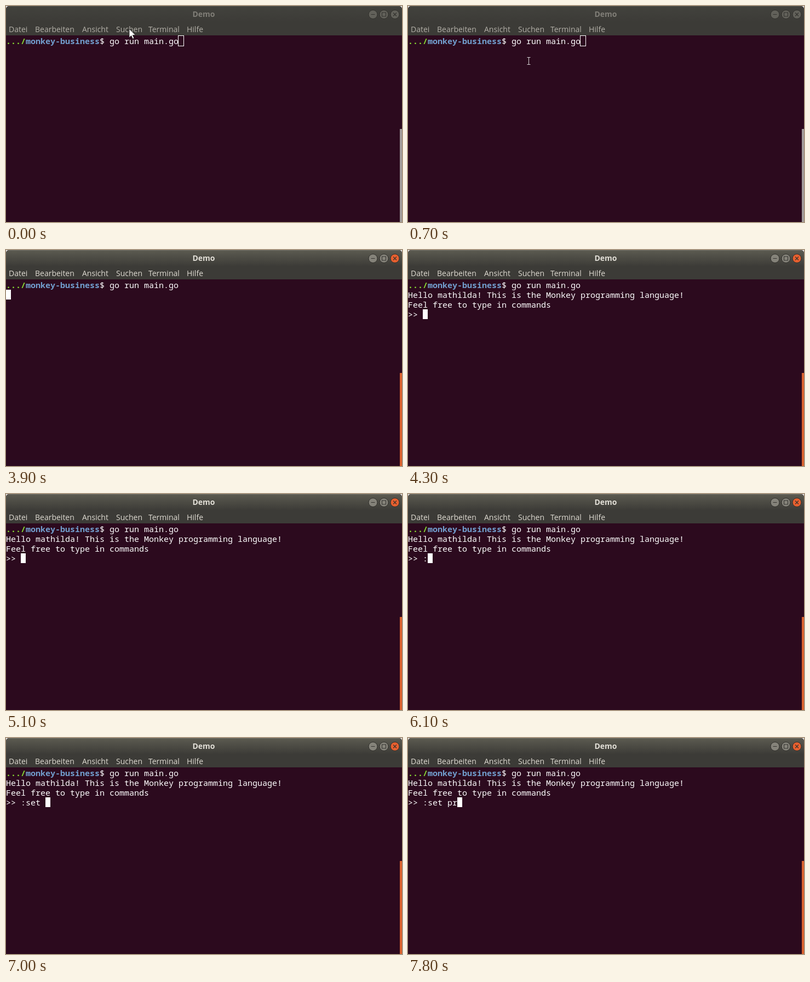
Write an HTML page that moves like this. It is 723 px wide and 397 px high and loops after 8 s.

```html
<!DOCTYPE html>
<html lang="de">
<head>
<meta charset="utf-8">
<title>Demo</title>
<style>
  html, body { margin: 0; width: 100%; height: 100%; overflow: hidden; }
  body { background: #e4e4e2; }

  #win {
    position: relative; width: 723px; height: 397px; overflow: hidden;
    background: #2c0a1e; border-radius: 6px 6px 0 0;
    --top: #42423d; --edge: #54534c; --title: #807e77; --menu: #b3b0a8;
    --btn: #62615a; --close: #62615a; --rim: #31302c; --bar: #a19b9a;
    --solid: 0; --hollow: 1;
  }
  #win, .anim { animation: 8s step-end infinite; }
  #win { animation-name: focus; }
  #win div, #win span.abs, #win svg { position: absolute; }

  .head {
    left: 0; top: 0; width: 723px; height: 54px; box-sizing: border-box;
    border-top: 1px solid var(--edge);
    background: linear-gradient(var(--top), #3c3b37 29px);
    font: 14px/20px "Open Sans", "Noto Sans", sans-serif;
    color: var(--menu);
  }
  .head span { top: 32px; white-space: nowrap; }
  .head .title {
    left: 0; top: 4px; width: 722px; text-align: center;
    font-weight: 700; color: var(--title);
  }
  .buttons { left: 660px; top: 5px; }
  .buttons circle { fill: var(--btn); stroke: var(--rim); }
  .buttons .close { fill: var(--close); }
  .buttons path { fill: none; stroke: #33322e; stroke-width: 1.1; }

  .term {
    left: 0; top: 55px; white-space: pre; color: #fff;
    font: 15px/18px "Noto Sans Mono", "DejaVu Sans Mono", monospace;
  }
  .term b { color: #8ae234; }
  .term b + b { color: #729fcf; }
  .out { left: 0; top: 18px; animation-name: output; }
  .typed { left: 0; top: 36px; width: 27px; height: 18px; overflow: hidden; animation-name: type; }

  .hollow {
    left: 314px; top: 54px; width: 11px; height: 20px; box-sizing: border-box;
    border: 1px solid #fff; opacity: var(--hollow);
  }
  .cursor { left: 0; top: 0; width: 9px; height: 18px; background: #fff; animation-name: move, blink; }
  .bar { right: 0; top: 226px; width: 4px; height: 171px; background: var(--bar); }

  .arrow, .beam { left: 0; top: 0; overflow: visible; }
  .arrow { animation-name: arrow; }
  .beam { animation-name: beam; }

  @keyframes focus {
    41.25%, 100% {
      --top: #5b5a50; --edge: #706f67; --title: #e2dfd7; --menu: #dfdbd2;
      --btn: #85837a; --close: #e8602f; --rim: #2f2e2a; --bar: #d9622f;
      --solid: 1; --hollow: 0;
    }
  }
  @keyframes output { 0% { opacity: 0; } 53.75%, 100% { opacity: 1; } }
  @keyframes type {
    0% { width: 27px; }
    76.25% { width: 36px; }
    82.5% { width: 45px; }
    83.75% { width: 54px; }
    85% { width: 63px; }
    87.5% { width: 72px; }
    96.25% { width: 81px; }
    97.5%, 100% { width: 90px; }
  }
  @keyframes move {
    0% { transform: translate(315px, 55px); }
    48.75% { transform: translate(0, 73px); }
    53.75% { transform: translate(27px, 109px); }
    76.25% { transform: translate(36px, 109px); }
    82.5% { transform: translate(45px, 109px); }
    83.75% { transform: translate(54px, 109px); }
    85% { transform: translate(63px, 109px); }
    87.5% { transform: translate(72px, 109px); }
    96.25% { transform: translate(81px, 109px); }
    97.5%, 100% { transform: translate(90px, 109px); }
  }
  @keyframes blink {
    0%, 56.25%, 71.25% { opacity: 0; }
    41.25%, 63.75%, 72.5%, 100% { opacity: 1; }
  }
  @keyframes arrow {
    0% { transform: translate(225px, 42px); opacity: 1; }
    1.25% { transform: translate(228px, 37px); opacity: 1; }
    2.5% { transform: translate(227px, 46px); opacity: 1; }
    3.75%, 100% { transform: translate(227px, 46px); opacity: 0; }
  }
  @keyframes beam {
    0% { transform: translate(224px, 78px); opacity: 0; }
    3.75% { transform: translate(224px, 78px); opacity: 1; }
    5% { transform: translate(220px, 104px); opacity: 1; }
    7.5% { transform: translate(217px, 107px); opacity: 1; }
    8.75% { transform: translate(220px, 101px); opacity: 1; }
    41.25% { transform: translate(220px, 103px); opacity: 1; }
    47.5% { transform: translate(220px, 103px); opacity: 0; }
    81.25% { transform: translate(226px, 103px); opacity: 1; }
    82.5%, 100% { transform: translate(226px, 103px); opacity: 0; }
  }
</style>
</head>
<body>
<div id="win">
  <div class="head">
    <div class="title">Demo</div>
    <span class="abs" style="left:5px">Datei</span>
    <span class="abs" style="left:53px">Bearbeiten</span>
    <span class="abs" style="left:139px">Ansicht</span>
    <span class="abs" style="left:201px">Suchen</span>
    <span class="abs" style="left:260px">Terminal</span>
    <span class="abs" style="left:330px">Hilfe</span>
    <svg class="buttons" width="62" height="20">
      <circle cx="10" cy="9.5" r="8"/>
      <circle cx="30" cy="9.5" r="8"/>
      <circle class="close" cx="50" cy="9.5" r="8"/>
      <path d="M6.5 9.5h7M26.5 6h7v7h-7zM47 6.5l6 6m0-6l-6 6"/>
    </svg>
  </div>

  <div class="term"><b>.../</b><b>monkey-business</b>$ go run main.go<div class="out anim">Hello mathilda! This is the Monkey programming language!
Feel free to type in commands
<div class="typed anim">&gt;&gt; :set pr</div></div></div>

  <div class="hollow"></div>
  <div class="cursor anim"></div>
  <div class="bar"></div>

  <svg class="arrow anim" width="12" height="19">
    <path d="M0 0V16L3.7 12.6 6.3 18.3 8.8 17.2 6.3 11.6H11.3Z" fill="#fff" stroke="#222" stroke-width=".8"/>
  </svg>
  <svg class="beam anim" width="1" height="1">
    <path d="M-2.5 -6.5h6M.5 -6.5v13M-2.5 6.5h6" fill="none" stroke="#d8d4d6"/>
  </svg>
</div>
</body>
</html>
```
